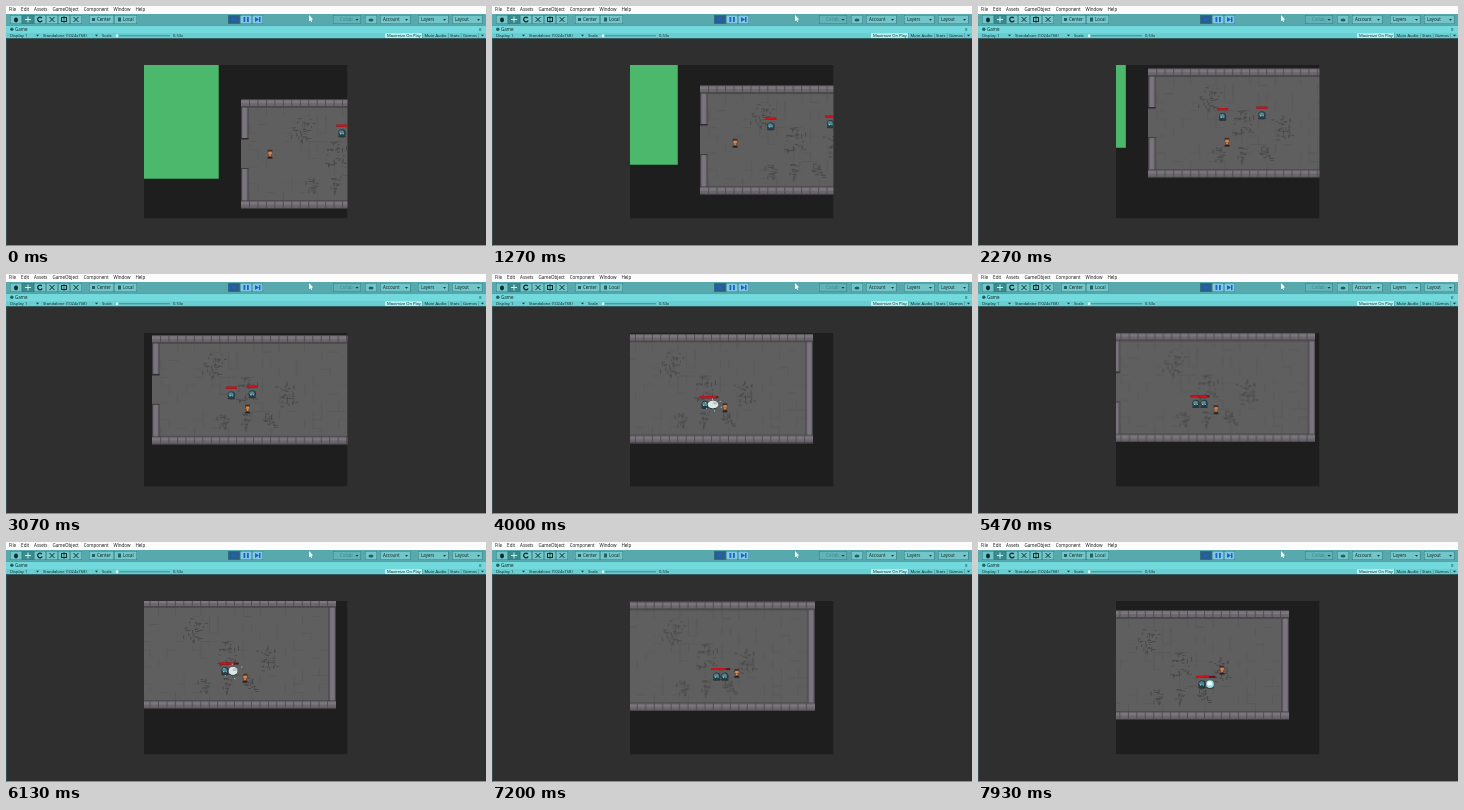
Write an HTML page with a canvas that moves like this. It is 480 px wide and 240 px high and loops after 8 s.

```html
<!DOCTYPE html>
<html lang="en">
<head>
<meta charset="utf-8">
<title>Dungeon room in editor</title>
<style>
html, body { margin: 0; width: 100%; height: 100%; overflow: hidden; background: #2f2f2f; }
canvas { display: block; }
</style>
</head>
<body>
<canvas id="stage" width="480" height="240"></canvas>
<script>
const LOOP = 8000, STEP = 1000 / 15;
const ROOM = { w: 203, h: 110, tile: 203 / 24, wall: 7.5, doorTop: 40, doorBottom: 69 };
const VIEW = { x: 138, y: 59, w: 203.5, h: 153.5 };
const FONT = '"Open Sans", "Noto Sans", sans-serif';
const INK = '#0f2c2e';

// Key poses: time, room position on screen, hero position in the room.
const walk = [
  [0, 235, 93, 29, 55],
  [1270, 208, 79, 35, 58],
  [2270, 170, 62, 79, 74],
  [4000, 118, 59.5, 115, 74],
  [4800, 142, 60, 95, 75],
  [6130, 127, 57, 112, 79],
  [7000, 123, 57, 122, 75],
  [7930, 108, 68, 136, 60]
];
const foes = [
  { x: 101, y: 34, behind: 20, ease: 1, hit: 0 },
  { x: 150, y: 36, behind: 12, ease: 1.8, hit: 1 }
];
const CHASE = 3600, LAG = 1400;
const STRIKE = { first: 3900, every: 2000, length: 280 };

const stage = document.getElementById('stage').getContext('2d');
const mix = (a, b, k) => a + (b - a) * k;

function rect(g, color, x, y, w, h) {
  g.fillStyle = color;
  g.fillRect(x, y, w, h);
}

function oval(g, color, x, y, rx, ry = rx) {
  g.fillStyle = color;
  g.beginPath();
  g.ellipse(x, y, rx, ry, 0, 0, Math.PI * 2);
  g.fill();
}

function triangle(g, color, ...points) {
  g.fillStyle = color;
  g.beginPath();
  for (let i = 0; i < 6; i += 2) g.lineTo(points[i], points[i + 1]);
  g.fill();
}

function line(g, color, width, x1, y1, x2, y2) {
  g.strokeStyle = color;
  g.lineWidth = width;
  g.beginPath();
  g.moveTo(x1, y1);
  g.lineTo(x2, y2);
  g.stroke();
}

// Returns the x where the text ends.
function label(g, text, x, y, size = 4.4, color = '#101c1d') {
  g.font = `${size}px ${FONT}`;
  g.fillStyle = color;
  g.fillText(text, x, y);
  return x + g.measureText(text).width;
}

function layer(w, h, draw) {
  const canvas = document.createElement('canvas');
  canvas.width = w;
  canvas.height = h;
  draw(canvas.getContext('2d'));
  return canvas;
}

function seeded(seed) {
  return () => (seed = (seed * 16807) % 2147483647) / 2147483647;
}

function poseAt(t) {
  const next = walk.findIndex(key => key[0] > t);
  const [a, b] = next < 0 ? [walk.at(-1), walk.at(-1)] : [walk[next - 1], walk[next]];
  const k = (t - a[0]) / (b[0] - a[0] || 1);
  const [, left, top, x, y] = a.map((value, i) => mix(value, b[i], k));
  return { left, top, x, y };
}

// A foe runs in from its start, then trails the hero.
function foeAt(foe, t) {
  const k = Math.min(1, t / CHASE) ** foe.ease;
  const trailY = poseAt(Math.max(0, t - LAG * k)).y - 3;
  return [mix(foe.x, poseAt(t).x - foe.behind, k), mix(foe.y, trailY, k)];
}

function button(g, x, w, color = '#72c6ca') {
  rect(g, '#347a7e', x, 9, w, 9);
  rect(g, color, x + 0.5, 9.5, w - 1, 8);
}

function arrow(g, x, y) {
  triangle(g, '#16383a', x, y, x + 3, y, x + 1.5, y + 1.8);
}

function drawTools(g) {
  for (let i = 0; i < 6; i++) button(g, 4 + i * 12, 12, i === 1 ? '#3a8a8e' : undefined);
  oval(g, INK, 10, 14, 2, 2.4);
  line(g, '#c9eeee', 1, 19, 13.5, 25, 13.5);
  line(g, '#c9eeee', 1, 22, 10.5, 22, 16.5);
  g.strokeStyle = INK;
  g.lineWidth = 1.3;
  g.beginPath();
  g.arc(34, 13.5, 2.3, 0.4, 5.6);
  g.stroke();
  for (const x of [46, 70]) {
    line(g, INK, 1, x - 2.5, 11, x + 2.5, 16);
    line(g, INK, 1, x - 2.5, 16, x + 2.5, 11);
  }
  g.strokeRect(55.5, 11.5, 5, 4);
  line(g, INK, 0.7, 58, 10, 58, 17);
}

function drawToolbar(g) {
  rect(g, '#57a9ae', 0, 8, 480, 12);
  drawTools(g);
  button(g, 83, 25);
  button(g, 108, 23);
  rect(g, '#245f63', 86, 12, 3, 3);
  rect(g, '#245f63', 112, 11.5, 3, 4);
  label(g, 'Center', 91, 15.2);
  label(g, 'Local', 117, 15.2);

  const glyph = '#1a63c8';
  button(g, 222, 12, '#2c5f86');
  button(g, 234, 12, '#80c8e4');
  button(g, 246, 11, '#80c8e4');
  triangle(g, glyph, 226, 11, 231, 13.5, 226, 16);
  rect(g, glyph, 237.5, 11, 1.8, 5);
  rect(g, glyph, 241, 11, 1.8, 5);
  triangle(g, glyph, 249, 11, 253, 13.5, 249, 16);
  rect(g, glyph, 253, 11, 1.5, 5);

  button(g, 327, 28, '#61b3b7');
  label(g, 'Collab', 334, 15.2, 4.4, '#3c858a');
  arrow(g, 349.5, 13);
  button(g, 359, 12);
  oval(g, '#245f63', 365, 14, 2.5, 1.6);
  for (const [name, x] of [['Account', 374], ['Layers', 412], ['Layout', 446]]) {
    button(g, x, 30.5);
    label(g, name, x + 3, 15.2);
    arrow(g, x + 25, 13);
  }
  triangle(g, '#fff', 303, 9, 303, 15, 307, 13.2);
  line(g, '#fff', 1, 304.5, 13, 305.7, 16);
}

function drawGameTab(g) {
  rect(g, '#4d9da1', 0, 19.5, 480, 0.5);
  rect(g, '#72dadd', 0, 20, 480, 7);
  oval(g, '#285e62', 5.8, 23.2, 1.7);
  label(g, 'Game', 9, 25, 4.5);
  label(g, '≡', 473, 25, 4.5);

  rect(g, '#69cdd1', 0, 27, 480, 5);
  rect(g, '#397b7e', 0, 32, 480, 0.6);
  const size = 4.1;
  label(g, 'Display 1', 4, 31, size);
  arrow(g, 30, 28.8);
  label(g, 'Standalone (1024x768)', 37, 31, size);
  arrow(g, 89, 28.8);
  label(g, 'Scale', 96, 31, size);
  line(g, '#31767a', 0.8, 109, 29.8, 164, 29.8);
  oval(g, '#e2fbfb', 111, 29.8, 1.5);
  label(g, '0.53x', 167, 31, size);

  rect(g, '#b5f2f3', 379, 27.2, 37, 4.8);
  let x = 381;
  for (const name of ['Maximize On Play', 'Mute Audio', 'Stats', 'Gizmos']) {
    x = label(g, name, x, 31, size) + 3.5;
    rect(g, '#458f93', x - 2, 27, 0.5, 5);
  }
  arrow(g, 475, 28.8);
}

function drawEditor(g) {
  rect(g, '#2f2f2f', 0, 0, 480, 240);
  rect(g, '#fcfcfc', 0, 0, 480, 8);
  let x = 3;
  for (const name of ['File', 'Edit', 'Assets', 'GameObject', 'Component', 'Window', 'Help'])
    x = label(g, name, x, 5.3, 4.5, '#111') + 5;
  drawToolbar(g);
  drawGameTab(g);
  rect(g, '#58a9ac', 0, 239, 480, 1);
  rect(g, '#3f6466', 0, 33, 0.6, 207);
}

// A row of stones along the x axis.
function wallRow(g, y) {
  const { w, tile, wall } = ROOM;
  rect(g, '#3d3b3e', 0, y, w, wall + 1);
  rect(g, '#6a666c', 0, y + 0.8, w, wall - 1);
  rect(g, '#7b767d', 0, y + 1.2, w, 3);
  for (let x = tile; x < w - 1; x += tile) rect(g, '#4d4a4f', x - 0.4, y + 0.8, 0.9, wall - 1);
}

function wallColumn(g, x, top, bottom) {
  const { wall } = ROOM;
  rect(g, '#454247', x, top, wall, bottom - top);
  rect(g, '#706b72', x + 1, top, wall - 2, bottom - top);
  rect(g, '#7a757c', x + 2, top, wall - 4, bottom - top);
}

function cracks(g, random, x, y, size, count) {
  for (let i = 0; i < count; i++) {
    const cx = x + (random() + random() - 1) * size * 0.45;
    const cy = y + (random() - 0.5) * size;
    const length = 1 + random() * 3.5;
    const flat = random() < 0.6;
    rect(g, '#454545', cx, cy, flat ? length : 0.8, flat ? 0.8 : length);
  }
}

function drawRoom(g) {
  const { w, h, tile, wall, doorTop, doorBottom } = ROOM;
  const random = seeded(83);
  rect(g, '#5f5f5f', 0, 0, w, h);
  for (let i = 0; i < 110; i++) {
    const x = tile * (1 + Math.floor(random() * 22)), y = tile * (1 + Math.floor(random() * 11));
    const flat = random() < 0.5;
    rect(g, '#585858', x, y, flat ? tile : 0.6, flat ? 0.6 : tile);
  }
  for (const [x, y] of [[61, 31], [95, 55], [133, 59]]) cracks(g, random, x, y, 25, 34);
  for (let i = 0; i < 3; i++) cracks(g, random, 71 + i * 23, 85, 15, 18);

  wallColumn(g, 0, 0, doorTop);
  wallColumn(g, 0, doorBottom, h);
  wallColumn(g, w - wall, 0, h);
  rect(g, '#2c2b2d', 0, doorTop - 1, wall, 1.5);
  rect(g, '#3d3b3e', 0, doorBottom, wall, 1);
  wallRow(g, 0);
  wallRow(g, h - wall - 1);
}

function drawHero(g, x, y) {
  oval(g, '#3c3a39', x, y + 4, 3.2, 1);
  rect(g, '#472b22', x - 2.3, y - 4.2, 4.6, 3);
  rect(g, '#cf8a58', x - 1.6, y - 2.4, 3.4, 2.5);
  rect(g, '#8a4a2c', x - 2.3, y, 4.6, 2.8);
  rect(g, '#c9ab88', x - 0.7, y + 0.3, 1.4, 1.5);
  rect(g, '#242021', x - 1.9, y + 2.8, 3.8, 1.4);
}

function drawFoe(g, x, y, health, hurt) {
  oval(g, '#303536', x, y + 3.3, 3.9, 1.2);
  oval(g, hurt ? '#9edbe5' : '#243c43', x, y, 3.8);
  oval(g, hurt ? '#eefcff' : '#4d8590', x - 0.4, y - 0.8, 2.5, 2);
  rect(g, hurt ? '#fff' : '#a9cdd2', x - 2, y + 0.2, 1.3, 1.2);
  rect(g, hurt ? '#fff' : '#86b2ba', x + 0.7, y + 0.2, 1.2, 1.2);
  rect(g, '#4f1a1c', x - 5.5, y - 8.3, 11, 2);
  rect(g, '#d90d18', x - 5.5, y - 8.3, 11 * health, 2);
}

function drawSlash(g, x, y, age) {
  oval(g, '#dfe6e6', x, y, 6 - age * 2, 3.8);
  oval(g, '#b9c5c7', x + 2, y - 1.5, 2.5, 1.5);
  for (let i = 0; i < 6; i++) {
    const angle = i * Math.PI / 3 + 0.4, reach = 7 + age * 4;
    rect(g, '#a7e7ec', x + Math.cos(angle) * reach, y + Math.sin(angle) * reach * 0.7, 1, 1);
  }
}

const editor = layer(480, 240, drawEditor);
const room = layer(ROOM.w, ROOM.h, drawRoom);

function draw(t) {
  const g = stage;
  const pose = poseAt(t);
  const sinceFirst = t - STRIKE.first;
  const strikes = Math.max(0, Math.floor(sinceFirst / STRIKE.every) + 1);
  const age = strikes ? (sinceFirst % STRIKE.every) / STRIKE.length : 1;

  g.drawImage(editor, 0, 0);
  g.save();
  g.beginPath();
  g.rect(VIEW.x, VIEW.y, VIEW.w, VIEW.h);
  g.clip();
  rect(g, '#1e1e1e', VIEW.x, VIEW.y, VIEW.w, VIEW.h);
  g.translate(pose.left, pose.top);
  rect(g, '#4cb86c', -140, -60, 117.7, 139.7);
  g.drawImage(room, 0, 0);
  for (const foe of foes) {
    const hurt = foe.hit && age < 1;
    const [x, y] = foeAt(foe, t);
    drawFoe(g, x, y, 1 - foe.hit * strikes * 0.2, hurt);
    if (hurt && age > 0.2) drawSlash(g, x, y, age);
  }
  drawHero(g, pose.x, pose.y);
  g.restore();
}

function tick() {
  const t = performance.now() % LOOP;
  draw(Math.floor((t + 4) / STEP) * STEP % LOOP);
  requestAnimationFrame(tick);
}
tick();
</script>
</body>
</html>
```
